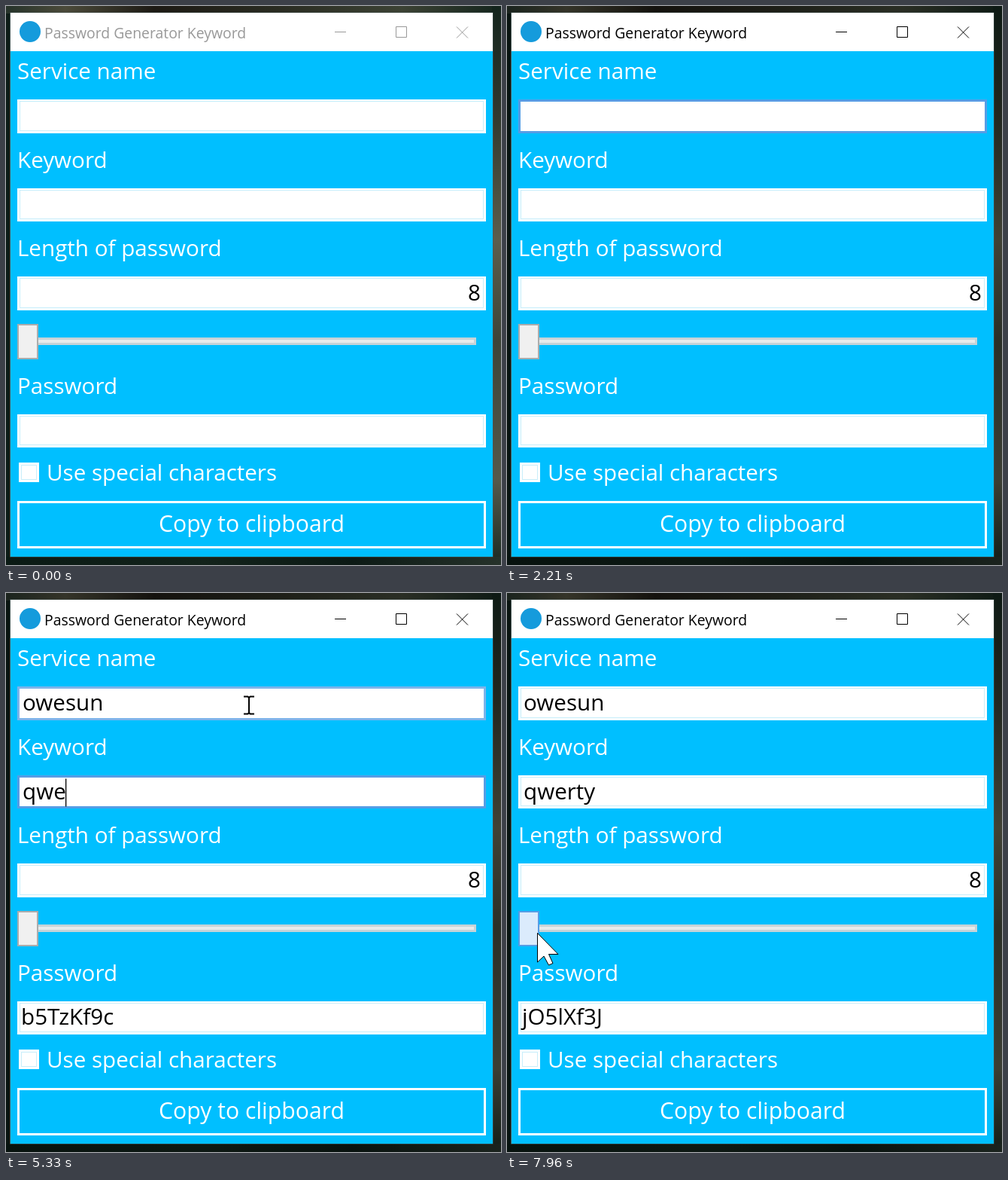
An HTML page that plays this animation: 658x742 px, repeating every 8 s.

```html
<!DOCTYPE html>
<html lang="en">
<head>
<meta charset="utf-8">
<title>Password Generator Keyword</title>
<style>
  html, body { margin: 0; width: 100%; height: 100%; overflow: hidden; background: #0d1c17; }
  svg { display: block; width: 100%; height: 100%; }
  text { font: 29.6px "Open Sans", "Noto Sans", sans-serif; fill: #fff; white-space: pre; }
  .value { fill: #000; }
</style>
</head>
<body>
<svg viewBox="0 0 658 742" xmlns="http://www.w3.org/2000/svg">
  <defs>
    <linearGradient id="top">
      <stop offset="0" stop-color="#26332a"/><stop offset=".12" stop-color="#4b4a3a"/>
      <stop offset=".3" stop-color="#1d1a14"/><stop offset=".55" stop-color="#2a2c22"/>
      <stop offset=".8" stop-color="#3c4234"/><stop offset="1" stop-color="#14251d"/>
    </linearGradient>
    <linearGradient id="side" x2="0" y2="1">
      <stop offset="0" stop-color="#13241c"/><stop offset=".2" stop-color="#32392e"/>
      <stop offset=".42" stop-color="#5c5e4c"/><stop offset=".6" stop-color="#3d4438"/>
      <stop offset=".85" stop-color="#55594a"/><stop offset="1" stop-color="#1b2a22"/>
    </linearGradient>
    <linearGradient id="low">
      <stop offset="0" stop-color="#0a1a14"/><stop offset=".4" stop-color="#13231b"/>
      <stop offset=".7" stop-color="#0c1a15"/><stop offset="1" stop-color="#26322a"/>
    </linearGradient>
  </defs>
  <rect width="658" height="742" fill="#0d1c17"/>
  <rect width="658" height="10" fill="url(#top)"/>
  <rect x="646" width="12" height="742" fill="url(#side)"/>
  <rect y="731" width="658" height="11" fill="url(#low)"/>
  <rect id="shade" width="658" height="742" fill="#000"/>

  <rect x="5" y="8.5" width="642.5" height="723" fill="#4a5a58"/>
  <rect x="6" y="9" width="641" height="722" fill="#00bfff"/>
  <rect x="6" y="9" width="641" height="51" fill="#fff"/>
  <circle cx="32" cy="34" r="14" fill="#159bdc"/>
  <text id="title" x="51" y="43" style="font-size:19.4px">Password Generator Keyword</text>
  <path id="buttons" d="M437 34.5h15M518.5 27.5h14v14h-14zM599 27.5l15 15m0-15l-15 15" fill="none"/>

  <g id="labels"></g>
  <g id="fields"></g>

  <rect x="17" y="440" width="608" height="10" fill="#c6d3d8"/>
  <rect x="19" y="443" width="603" height="4" fill="#e7eaea"/>
  <rect id="thumb" x="16" y="423" width="26" height="45" stroke-width="2"/>

  <rect x="17" y="606" width="27" height="26" fill="#fff"/>
  <rect x="20.5" y="609.5" width="20" height="19" fill="#fff" stroke="#c8eefa"/>
  <rect x="16.5" y="658.5" width="620" height="60" fill="none" stroke="#fff" stroke-width="3"/>
  <text x="326.5" y="698" text-anchor="middle" style="font-size:30.2px">Copy to clipboard</text>

  <rect id="caret" width="1.3" height="37" fill="#000"/>
  <path id="arrow" d="M.5.5V39L9 31L15.5 43L21 40.5L15.5 28.5H28Z" fill="#fff" stroke="#000"/>
  <path id="beam" d="M-7-11.5h5.5l1.5 1.5l1.5-1.5H7M0-10V10M-7 11.5h5.5l1.5-1.5l1.5 1.5H7" fill="none" stroke="#000" stroke-width="2"/>
</svg>
<script>
const LOOP = 8000;
const WHITE = [255, 255, 255], HOVER = [126, 180, 234], FOCUS = [86, 157, 229];
const $ = id => document.getElementById(id);

function add(parent, tag, attrs, text = "") {
  const el = document.createElementNS("http://www.w3.org/2000/svg", tag);
  for (const k in attrs) el.setAttribute(k, attrs[k]);
  el.textContent = text;
  return parent.appendChild(el);
}
function set(el, attrs) {
  for (const k in attrs) el.setAttribute(k, attrs[k]);
}
const show = (el, on) => set(el, { visibility: on ? "visible" : "hidden" });
const ramp = (t, a, b) => Math.min(1, Math.max(0, (t - a) / (b - a)));
const mix = (a, b, k) => a.map((v, i) => v + (b[i] - v) * k);
const rgb = c => `rgb(${c.map(Math.round)})`;
const between = (t, a, b) => t >= a && t < b;

[["Service name", 15, 97], ["Keyword", 15, 215], ["Length of password", 15, 332],
 ["Password", 15, 515], ["Use special characters", 54, 630]]
  .forEach(([s, x, y]) => add($("labels"), "text", { x, y }, s));

function makeField(y, h, x, base, anchor = "start") {
  const g = $("fields");
  return {
    y, h,
    box: add(g, "rect", { x: 16.5, y: y + 1.5, width: 620, height: h - 3, fill: "#fff", "stroke-width": 3 }),
    line: add(g, "rect", { x: 18.5, y: y + 2.5, width: 616, height: h - 6, fill: "none", stroke: "#c8eefa" }),
    text: add(g, "text", { x, y: base, class: "value", "text-anchor": anchor })
  };
}
const service = makeField(124, 45, 22, 156);
const keyword = makeField(242, 44, 22, 274);
const size = makeField(359, 45, 631, 391, "end");
const password = makeField(542, 44, 20, 573);
const fields = [service, keyword, size, password];
size.text.textContent = "8";

const NAME = "owesun", NAME_AT = [2260, 2430, 2600, 2850, 3050, 3430];
const WORD = "qwerty", WORD_AT = [4910, 5080, 5330, 5700, 5880, 6160];
const RESULTS = ["", "xW4nGd8t", "Ke7RsL2v", "b5TzKf9c", "r8Yht3Pe", "MwG6nDu4", "jO5lXf3J"];
const typed = (times, t) => times.filter(at => t >= at).length;

// Pointer path: time, x, y
const PATH = [[240, 345, 537], [1010, 319, 152], [1750, 319, 152], [1790, 323, 149],
              [6910, 323, 149], [7420, 100, 441], [7650, 40, 453], [7730, 40, 451]];

function pointer(t) {
  const i = PATH.findIndex(p => t < p[0]);
  if (i < 0) return PATH[PATH.length - 1].slice(1);
  if (i === 0) return PATH[0].slice(1);
  const [a, b] = [PATH[i - 1], PATH[i]];
  let k = ramp(t, a[0], b[0]);
  if (i === 1) k = k * (2 - k);
  return mix(a, b, k).slice(1);
}

function drawCaret(field, on) {
  const w = field.text.textContent ? field.text.getComputedTextLength() : 0;
  set($("caret"), { x: 21 + Math.round(w), y: field.y + 4.5 });
  show($("caret"), on);
}

function draw(t) {
  const active = t >= 1180;
  set($("shade"), { opacity: 0.3 * ramp(t, 1180, 1470) });
  $("title").style.fill = active ? "#000" : "#999";
  set($("buttons"), { stroke: active ? "#000" : "#999" });

  const [x, y] = pointer(t);
  const visible = t >= 240 && !between(t, 2210, 3850);
  const over = f => t >= 240 && x > 15 && x < 638 && y >= f.y && y < f.y + f.h;
  const inText = fields.some(over);
  show($("beam"), visible && inText);
  show($("arrow"), visible && !inText);
  const place = `translate(${Math.round(x)} ${Math.round(y)})`;
  set($("beam"), { transform: place });
  set($("arrow"), { transform: place });

  const tab = ramp(t, 3850, 3940);
  const focus = [ramp(t, 1180, 1300) - tab, tab - ramp(t, 7730, 7930), 0, 0];
  fields.forEach((f, i) => {
    const hover = over(f);
    set(f.box, { stroke: rgb(mix(hover ? HOVER : WHITE, FOCUS, Math.min(1, Math.max(0, focus[i])))) });
    set(f.line, { opacity: hover ? 0 : 1 - Math.min(1, Math.max(0, focus[i])) });
  });

  const n = typed(WORD_AT, t);
  service.text.textContent = NAME.slice(0, typed(NAME_AT, t));
  keyword.text.textContent = WORD.slice(0, n);
  password.text.textContent = RESULTS[n];

  if (t < 3850) drawCaret(service, between(t, 1220, 1750) || t >= 2260);
  else drawCaret(keyword, between(t, 3940, 4480) || between(t, 4910, 6730) || between(t, 7260, 7730));

  const onThumb = t > 7000 && x < 43 && y > 422;
  const press = ramp(t, 7730, 7930);
  set($("thumb"), {
    fill: onThumb ? "#dbebfc" : "#f0f0f0",
    stroke: onThumb ? rgb(mix(HOVER, FOCUS, press)) : "#acacac"
  });
}

function tick(now) {
  draw(now % LOOP);
  requestAnimationFrame(tick);
}
draw(0);
requestAnimationFrame(tick);
</script>
</body>
</html>
```
